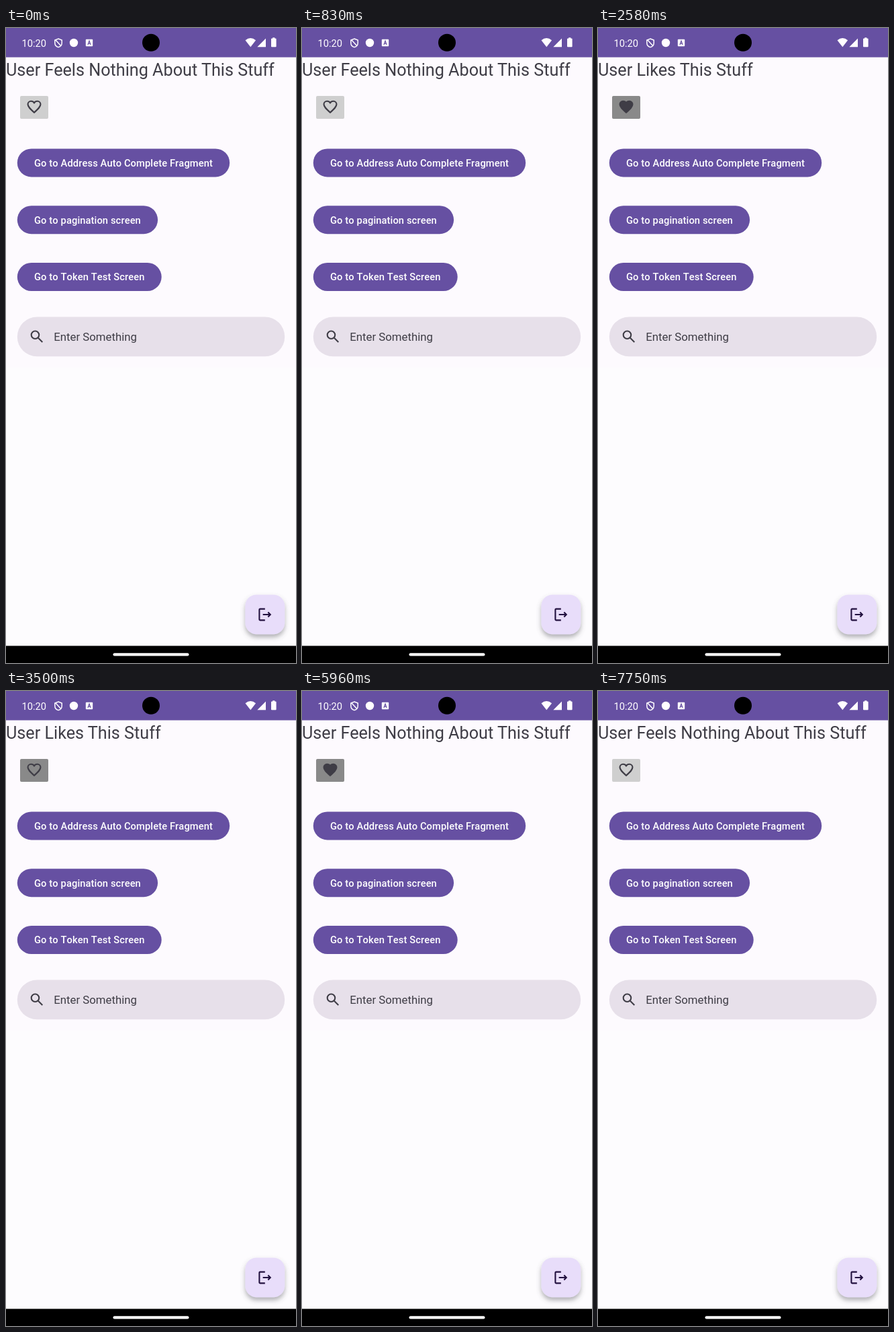
Animation of 432x944 px, one loop 8000 ms. Source, as an HTML page:

```html
<!DOCTYPE html>
<html lang="en">
<head>
<meta charset="utf-8">
<title>Like toggle</title>
<style>
  :root { --purple: #6650a2; --ink: #3f3d46; }
  html, body { margin: 0; width: 100%; height: 100%; overflow: hidden; background: #fdfcfe; }
  svg { display: block; width: 100%; height: 100%; }
  text { font-family: Roboto, "Noto Sans", sans-serif; fill: var(--ink); }
  .purple { fill: var(--purple); }
  .status, .status text { fill: #fffdff; }
  .label { font-size: 14.7px; font-weight: 500; letter-spacing: .1px; font-kerning: none; fill: #fff; }
  .icon { fill: none; stroke: var(--ink); stroke-width: 2; }
</style>
</head>
<body>
<svg viewBox="0 0 432 944">
  <defs>
    <filter id="shadow" x="-30%" y="-30%" width="160%" height="170%">
      <feDropShadow dx="0" dy="4.5" stdDeviation="3.5" flood-color="#55535c" flood-opacity=".45"/>
    </filter>
  </defs>
  <rect width="432" height="944" fill="#fdfcfe"/>
  <rect width="432" height="505" fill="#fdfafe"/>

  <rect class="purple" width="432" height="43.5"/>
  <circle cx="216" cy="21.7" r="13"/>
  <g class="status">
    <text x="23.5" y="27.5" font-size="14.7">10:20</text>
    <path d="M78 16l5.2 2v4.2c0 3.2-2.2 5.4-5.2 6.4-3-1-5.2-3.2-5.2-6.4V18zM73.6 17.6l8.4 9.2" fill="none" stroke="#fffdff" stroke-width="1.5"/>
    <circle cx="101" cy="22" r="6.2"/>
    <rect x="118.8" y="16.8" width="10.4" height="10.4" rx="1"/>
    <path d="M356.5 18.2q7.8-6.2 15.6 0L364.3 28.2zM387 15.5V28.2H374.3z"/>
    <path d="M396 15.6h1.2v-1.3h3.2v1.3h1.2q1 0 1 1v10.6q0 1-1 1H396q-1 0-1-1V16.6q0-1 1-1z"/>
  </g>
  <path d="M121.9 25l2.1-6 2.1 6M122.6 23.2h2.8" fill="none" stroke="#6650a2" stroke-width="1.2"/>

  <text id="title" y="71" font-size="25.2"></text>

  <rect id="box" x="21" y="101" width="42" height="34" rx="2"/>
  <path id="heart" class="icon" transform="translate(29.4 104.6) scale(1.05)" stroke-linejoin="round"
    d="M12 20C6 14.6 3 11.8 3 8.5 3 6 5 4 7.5 4 9.4 4 11.2 5 12 6.6 12.8 5 14.6 4 16.5 4 19 4 21 6 21 8.5c0 3.3-3 6.1-9 11.5z"/>

  <g id="buttons"></g>

  <rect x="16.8" y="429.5" width="398.4" height="58.8" rx="29.4" fill="#e7e0ea"/>
  <g class="icon" transform="translate(33.5 446.3) scale(1.05)">
    <circle cx="9.5" cy="9.5" r="5.5"/>
    <path d="M13.6 13.6l6.2 6.2"/>
  </g>
  <text x="71.3" y="465.3" font-size="16.8">Enter Something</text>

  <rect x="356.4" y="842.4" width="58.8" height="58.8" rx="16.8" fill="#e8ddfa" filter="url(#shadow)"/>
  <path class="icon" transform="translate(373.2 859.4) scale(1.05)" style="stroke: #22113f"
    d="M12 4H5a1 1 0 0 0-1 1v14a1 1 0 0 0 1 1h7M9 12h10M16.3 8.7l3.3 3.3-3.3 3.3"/>

  <rect y="918.5" width="432" height="25.5"/>
  <rect x="159.5" y="929.3" width="113" height="4.2" rx="2.1" fill="#fff"/>
</svg>
<script>
const LOOP = 8000;
const LIKE = 1550, HOLLOW = 3000, REFILL = 4250, UNLIKE = 5500, RELEASE = 6700;
const PAD = 25.2;
const $ = id => document.getElementById(id);
const title = $("title"), heart = $("heart"), box = $("box");

function addButton(label, i) {
  const y = 179.4 + 84.8 * i;
  const group = document.createElementNS("http://www.w3.org/2000/svg", "g");
  group.innerHTML = `<rect class="purple" x="16.8" y="${y}" height="42" rx="21"/>
    <text class="label" x="${16.8 + PAD}" y="${y + 26.4}">${label}</text>`;
  $("buttons").append(group);
  const width = group.querySelector("text").getComputedTextLength() + 2 * PAD;
  group.querySelector("rect").setAttribute("width", width);
}
["Go to Address Auto Complete Fragment", "Go to pagination screen", "Go to Token Test Screen"].forEach(addButton);

const within = (t, from, to) => t >= from && t < to;
const ramp = (t, from, span) => Math.min(1, Math.max(0, (t - from) / span));

function draw(t) {
  const liked = within(t, LIKE, UNLIKE);
  const filled = within(t, LIKE, HOLLOW) || within(t, REFILL, RELEASE);
  const pressed = ramp(t, LIKE, 320) - ramp(t, RELEASE, 250);
  const grey = Math.round(207 - 70 * pressed);

  title.textContent = liked ? "User Likes This Stuff" : "User Feels Nothing About This Stuff";
  heart.style.fill = filled ? "var(--ink)" : "none";
  box.style.fill = `rgb(${grey}, ${grey}, ${grey})`;
}

const start = performance.now();
function tick() {
  draw((performance.now() - start) % LOOP);
  requestAnimationFrame(tick);
}
tick();
</script>
</body>
</html>
```
